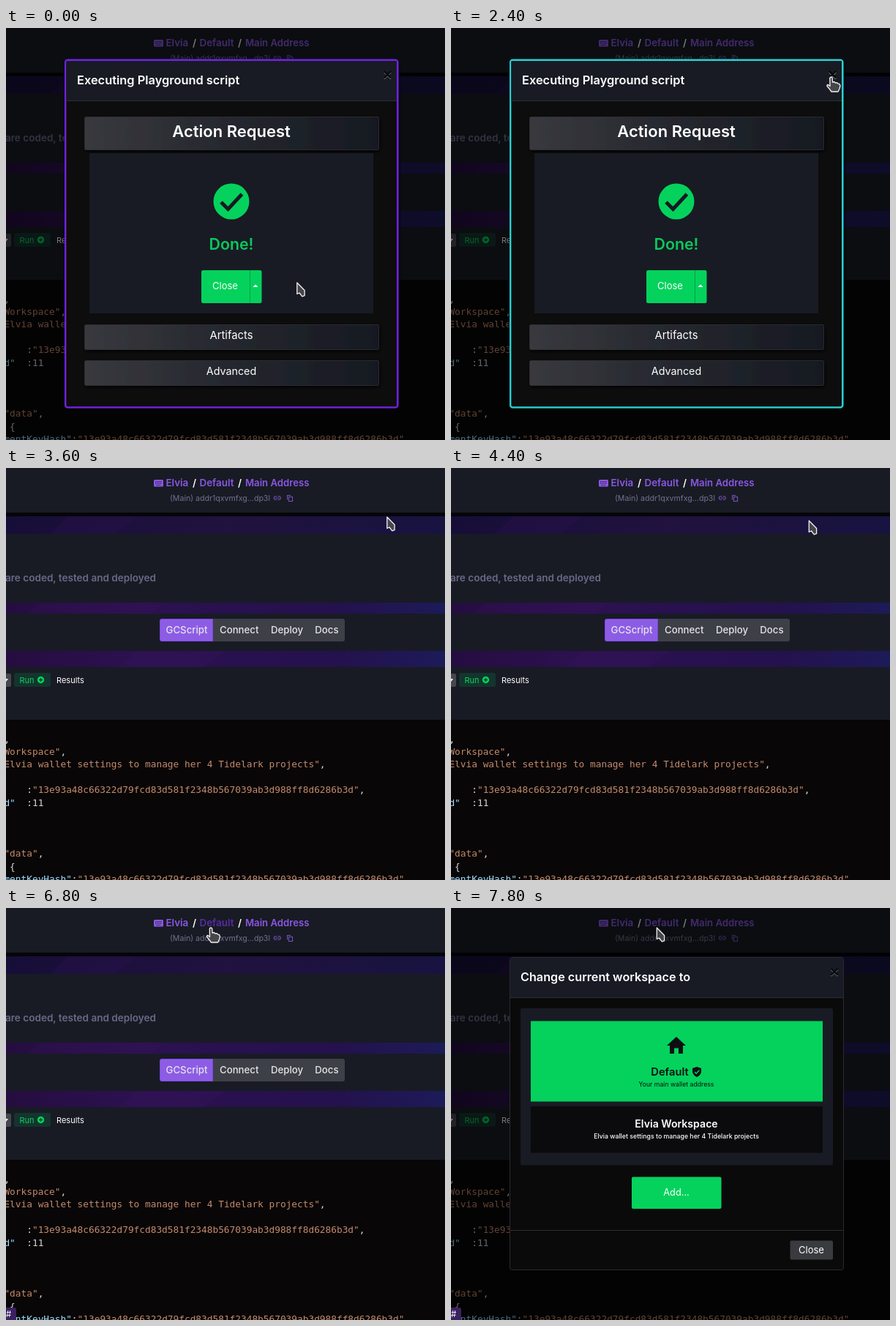
These frames come from a looping animation (600 by 563 pixels, 8 s). An HTML page:

```html
<!DOCTYPE html>
<html lang="en">
<head>
<meta charset="utf-8">
<title>Workspace switch</title>
<style>
  html, body { margin: 0; width: 100%; height: 100%; overflow: hidden; background: #080607; }
  svg { display: block; width: 100%; height: 100%; }
  text { font-family: Inter, Roboto, sans-serif; fill: #fff; white-space: pre; }
  .mid { text-anchor: middle; }
  .bold { font-weight: 600; }
  .nav text { font-size: 13.4px; font-weight: 600; }
  .nav .link { fill: #8b57e4; }
  .tabs text { font-size: 13.2px; font-weight: 500; fill: #e4e4e8; }
  .code text { font: 12.8px "DejaVu Sans Mono", monospace; fill: #d8d8d8; }
  .code .s { fill: #c58a6c; }
  .code .k { fill: #9cdcfe; }
  .panel { fill: #181b24; }
  .go { fill: #04d25c; }
  .cursor { fill: #47474b; stroke: #f2f2f2; stroke-width: 1.3; stroke-linejoin: round; }
</style>
</head>
<body>
<svg viewBox="0 0 600 563" preserveAspectRatio="none">
  <defs>
    <linearGradient id="bandTop">
      <stop offset="0" stop-color="#160e38"/><stop offset=".5" stop-color="#21123f"/><stop offset="1" stop-color="#171340"/>
    </linearGradient>
    <linearGradient id="bandLow">
      <stop offset="0" stop-color="#250d40"/><stop offset=".3" stop-color="#2c1150"/>
      <stop offset=".75" stop-color="#24114d"/><stop offset="1" stop-color="#1c1b58"/>
    </linearGradient>
    <linearGradient id="bar">
      <stop offset="0" stop-color="#38393e"/><stop offset=".5" stop-color="#25272e"/><stop offset="1" stop-color="#161922"/>
    </linearGradient>
    <filter id="shadow" x="-10%" y="-30%" width="120%" height="170%">
      <feDropShadow dx="1" dy="2" stdDeviation="2" flood-color="#000" flood-opacity=".9"/>
    </filter>
    <g id="cross" fill="none" stroke-width="2.2">
      <path d="M-4.5-3.5 4.5 5.5M4.5-3.5-4.5 5.5" stroke="#777a80"/>
      <path d="M-4.5-4.8 4.5 4.2M4.5-4.8-4.5 4.2" stroke="#000"/>
    </g>
  </defs>

  <!-- page -->
  <rect width="600" height="563" fill="#080607"/>
  <rect class="panel" width="600" height="344"/>
  <rect y="61" width="600" height="29" fill="url(#bandTop)"/>
  <rect y="61" width="600" height="5" fill="#050509"/>
  <rect y="184" width="600" height="15" fill="url(#bandLow)"/>
  <rect y="250" width="600" height="22" fill="url(#bandLow)"/>
  <g fill="#4a1770" opacity=".13">
    <path d="M60 90 85 66H180L150 90Z"/>
    <path d="M30 199 48 184H215L198 199Z"/>
    <path d="M155 272 180 250H300L270 272Z"/>
  </g>

  <g class="nav">
    <rect x="202" y="16" width="13" height="9.5" rx="1.5" fill="#8b57e4"/>
    <path d="M204 18.7H213M204 20.9H213M205.5 23.4H211.5" stroke="#181b24" stroke-dasharray="1.3 .8"/>
    <text class="link" x="218.5" y="25.3">Elvia</text>
    <text x="255" y="25.3">/</text>
    <text class="link" id="workspace" x="264.5" y="25.3">Default</text>
    <text x="317" y="25.3">/</text>
    <text class="link" x="327" y="25.3" style="font-size:13.15px">Main Address</text>
  </g>
  <text x="224" y="45" font-size="10.6" style="fill:#70728f">(Main) addr1qxvmfxg...dp3l</text>
  <g fill="none" stroke="#7752bd" stroke-width="1.1">
    <path d="M370 38.8H368.5A2.2 2.2 0 0 0 368.5 43.2H370M371.5 38.8H373A2.2 2.2 0 0 1 373 43.2H371.5M368.5 41H373"/>
    <path d="M386.5 39.5H391.5V45.5H386.5ZM384.5 43.5V37.5H389.5"/>
  </g>
  <text x="-1" y="154.5" font-size="13.55" font-weight="600" style="fill:#686986">are coded, tested and deployed</text>

  <g class="tabs">
    <rect x="210" y="206" width="253" height="31" rx="3" fill="#3e4047"/>
    <path d="M282.5 206.5V236.5H213A2.5 2.5 0 0 1 210.5 234V209A2.5 2.5 0 0 1 213 206.5Z" fill="#8d5ce6" stroke="#7c48dd"/>
    <text class="mid" x="247" y="226">GCScript</text>
    <text class="mid" x="318.7" y="226">Connect</text>
    <text class="mid" x="384" y="226">Deploy</text>
    <text class="mid" x="438.4" y="226">Docs</text>
  </g>

  <rect x="-5" y="281" width="12" height="18" rx="2" fill="#45474e"/>
  <path d="M-3 288H3L0 292Z" fill="#fff"/>
  <rect x="11" y="280" width="50" height="19" rx="3" fill="#13352d"/>
  <text x="18.5" y="293.5" font-size="11" style="fill:#10cf60">Run</text>
  <circle cx="47.5" cy="289.5" r="4.7" class="go"/>
  <path d="M45 289.5H50M47.5 287V292" stroke="#13352d" stroke-width="1.3"/>
  <text x="69" y="293.5" font-size="11">Results</text>

  <g class="code" id="code"></g>

  <rect id="backdrop" width="600" height="563" opacity=".52"/>

  <!-- script result -->
  <g id="result">
    <rect id="frame" x="81.2" y="43.8" width="454" height="474.6" rx="3" fill="#0a0909" stroke-width="2.4" filter="url(#shadow)"/>
    <rect class="panel" x="82.5" y="45" width="451.5" height="54"/>
    <path d="M82.5 99.5H534" stroke="#2b2d33"/>
    <text class="bold" x="97" y="77" font-size="16.4">Executing Playground script</text>
    <use id="resultCross" href="#cross" x="521.5" y="64"/>
    <g fill="url(#bar)" stroke="#303239" stroke-width=".8" filter="url(#shadow)">
      <rect x="107.5" y="121.5" width="402" height="45" rx="2"/>
      <rect x="107.5" y="405.5" width="402" height="34" rx="2"/>
      <rect x="107.5" y="454.5" width="402" height="34" rx="2"/>
    </g>
    <text class="mid bold" x="308" y="149" font-size="22">Action Request</text>
    <rect class="panel" x="114" y="171" width="388" height="219"/>
    <circle class="go" cx="308" cy="237" r="24.5"/>
    <path d="M294 238 303.5 247.5 322.5 227" fill="none" stroke="#171a22" stroke-width="5"/>
    <text class="mid bold" x="308" y="302.5" font-size="21.3" style="fill:#0bc95c">Done!</text>
    <rect class="go" x="267" y="331" width="82.5" height="45" rx="2.5"/>
    <path d="M333.5 331V376" stroke="#07a049"/>
    <text class="mid" x="299.5" y="357.3" font-size="13">Close</text>
    <path d="M337.5 354 341 350.5 344.5 354Z" fill="#fff"/>
    <text class="mid" x="308" y="425" font-size="14.8">Artifacts</text>
    <text class="mid" x="308" y="474" font-size="14.3">Advanced</text>
  </g>

  <!-- workspace picker -->
  <g id="picker">
    <rect x="80.5" y="67.5" width="456" height="427" rx="3" fill="#0b0a0b" stroke="#2a2b30"/>
    <rect class="panel" x="81" y="68" width="455" height="54"/>
    <path d="M81 122.5H536M81 440.5H536" stroke="#2b2d33"/>
    <text class="bold" x="95" y="99.5" font-size="16.2">Change current workspace to</text>
    <use href="#cross" x="524" y="87.5" opacity=".7"/>
    <rect class="panel" x="95" y="137" width="427" height="214.5" rx="2"/>
    <rect class="go" x="109" y="154.5" width="399" height="110"/>
    <path d="M308 176 321 188H317V199H311V191.5H305V199H299V188H295Z" fill="#0c0f12"/>
    <text class="mid bold" x="299" y="229.3" font-size="14.7" style="fill:#0c0f12">Default</text>
    <path d="M336 217 342 219V224Q341 229 336 231Q331 229 330 224V219Z" fill="#0c0f12"/>
    <path d="M333 224 335.2 226.2 339.3 221.8" fill="none" stroke="#04d25c" stroke-width="1.4"/>
    <text class="mid" x="308" y="244.3" font-size="8.7" style="fill:#0c0f12">Your main wallet address</text>
    <rect x="109" y="271" width="399" height="63.5" fill="#0b0a0d"/>
    <text class="mid bold" x="308" y="300" font-size="14.1">Elvia Workspace</text>
    <text class="mid" x="308" y="314.5" font-size="8.75" font-weight="500">Elvia wallet settings to manage her 4 Tidelark projects</text>
    <rect class="go" x="247" y="367.5" width="122.5" height="43.5" rx="2"/>
    <text class="mid" x="308" y="393" font-size="12.8">Add...</text>
    <rect x="463.5" y="454.5" width="58.5" height="26" rx="2" fill="#3a3b3f"/>
    <text class="mid" x="492.5" y="472" font-size="13">Close</text>
  </g>

  <g id="status">
    <path d="M0 546H11Q14 546 14 549V563H0Z" fill="#3a2160"/>
    <text x="0" y="558.5" font-size="11.5">#</text>
  </g>

  <g id="cursor" class="cursor">
    <path id="arrow" d="M-.7 0V15.5L2.5 14 6.3 18.8 9.6 17.6V10.5Z"/>
    <path id="hand" transform="translate(-2 0)" d="M-1.7 1.2Q0-1.2 1.7 1.2L2 7 4.5 6.5 6 8 8.3 7.7 9.5 9.2 11.5 9.5 12.5 12 11.5 16 9.5 20H.5L-2.5 16-5.5 12.5Q-6 10.5-4 10.5L-1.5 12.5Z"/>
  </g>
</svg>

<script>
const LOOP = 8000, STEP = 200;
const CLOSED = 3600, HOVER = 5400, OPENED = 6835;
const $ = id => document.getElementById(id);
const show = (id, on) => $(id).setAttribute('display', on ? 'inline' : 'none');

// Editor rows: line number, then [class, text] runs.
const hash = '"13e93a48c66322d79fcd83d581f2348b567039ab3d988ff8d6286b3d"';
const rows = [
  [0, ['', ',']],
  [1, ['s', 'Workspace"'], ['', ',']],
  [2, ['s', 'Elvia wallet settings to manage her 4 Tidelark projects"'], ['', ',']],
  [4, ['', '    :'], ['s', hash], ['', ',']],
  [5, ['k', 'd"'], ['', '  :11']],
  [9, ['s', '"data"'], ['', ',']],
  [10, ['', ' {']],
  [11, ['k', 'mentKeyHash"'], ['', ':'], ['s', hash]],
];
$('code').innerHTML = rows.map(([line, ...runs]) =>
  `<text x="-2.6" y="${374.6 + line * 17.4}">` +
  runs.map(([kind, text]) => `<tspan class="${kind}">${text}</tspan>`).join('') +
  '</text>').join('');

// Interpolates keys of the form [time, ...values].
function track(keys, t, ease = u => u) {
  const i = keys.findIndex(key => key[0] > t);
  if (i < 0) return keys[keys.length - 1].slice(1);
  const a = keys[i - 1], b = keys[i];
  const u = ease((t - a[0]) / (b[0] - a[0]));
  return a.slice(1).map((v, n) => v + (b[n + 1] - v) * u);
}
const smooth = u => u * u * (3 - 2 * u);

const pointer = [
  [0, 398.5, 348], [400, 398.5, 348], [1600, 521.5, 67], [3600, 521.5, 67],
  [4400, 490, 72], [5600, 282, 27],
];
const glow = [[0, 112, 34, 224], [2400, 42, 205, 208], [3600, 32, 230, 186]];

function draw(t) {
  const resultOpen = t < CLOSED, pickerOpen = t >= OPENED;
  const overCross = t >= 1600 && resultOpen;
  const overLink = t >= HOVER && !pickerOpen;

  show('result', resultOpen);
  show('picker', pickerOpen);
  show('backdrop', resultOpen || pickerOpen);
  show('status', t >= HOVER);
  show('hand', overCross || overLink);
  show('arrow', !overCross && !overLink);

  $('frame').setAttribute('stroke', `rgb(${track(glow, t).map(Math.round)})`);
  $('resultCross').setAttribute('opacity', overCross ? 1 : .7);
  $('workspace').style.fill = overLink ? '#5a2aa6' : '';

  const [x, y] = track(pointer, t, smooth);
  $('cursor').setAttribute('transform', `translate(${x} ${y})`);

  const rest = Math.max(0, 1 - (t - OPENED) / 300);
  $('picker').setAttribute('transform', `translate(0 ${-50 * Math.min(1, rest) ** 1.64})`);
}

function tick() {
  const t = performance.now() % LOOP;
  draw(Math.floor(t / STEP) * STEP);
  requestAnimationFrame(tick);
}
tick();
</script>
</body>
</html>
```
